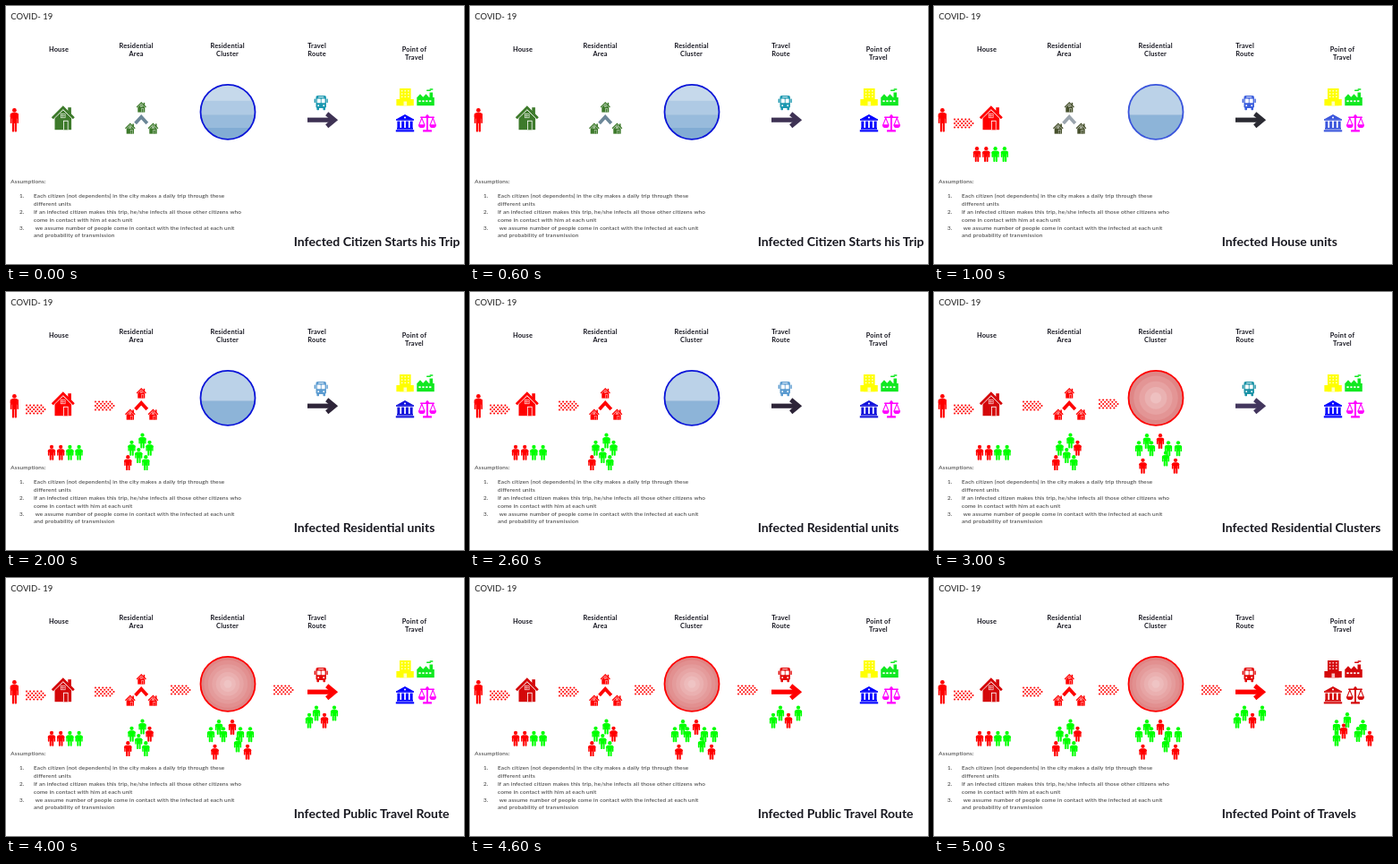
Write an HTML page with a canvas that moves like this. It is 512x288 px and loops after 6000 ms.

```html
<!DOCTYPE html>
<html lang="en">
<head>
<meta charset="utf-8">
<title>Trip of an infected citizen</title>
<style>
  html, body { margin: 0; width: 100%; height: 100%; overflow: hidden; background: #fff; }
  canvas, svg { position: absolute; left: 0; top: 0; width: 512px; height: 288px; }
  text { font-family: Lato, "Open Sans", sans-serif; white-space: pre; }
  .title { font-size: 9.5px; fill: #222; }
  .head { font-size: 7.4px; font-weight: 700; letter-spacing: .2px; text-anchor: middle; fill: #15151f; }
  .note { font-size: 6.4px; letter-spacing: .15px; fill: #333; }
  .caption { font-size: 14px; font-weight: 700; fill: #17171f; }
</style>
</head>
<body>
<canvas id="stage" width="512" height="288"></canvas>
<svg id="words" viewBox="0 0 512 288"></svg>
<script>
const ctx = document.getElementById('stage').getContext('2d');
const words = document.getElementById('words');
const STEP = 1000;
const RED = '#f00', DEEP = '#d4080a', GREEN = '#0f0', LEAF = '#3d7a2b';

// Colours of the parts the infection has not reached yet.
const scenes = [
  { text: 'Infected Citizen Starts his Trip', area: LEAF, peak: '#6c8798', edge: '#0a14d8',
    bus: '#1b98b0', arrow: '#3e3254', bank: '#00f', tones: 4 },
  { text: 'Infected House units', area: '#46502c', peak: '#9ba5ae', edge: '#3954dc',
    bus: '#3a5ddd', arrow: '#2b2b33', bank: '#3a55dc', tones: 2 },
  { text: 'Infected Residential units', edge: '#0a14d8',
    bus: '#5b9bd0', arrow: '#2d2438', bank: '#1212dc', tones: 2 },
  { text: 'Infected Residential Clusters', bus: '#1a92a6', arrow: '#43365e', bank: '#00f', tones: 5 },
  { text: 'Infected Public Travel Route', bank: '#00f', tones: 7 },
  { text: 'Infected Point of Travels', tones: 7 }
];

function addText(kind, x, y, str) {
  const el = document.createElementNS('http://www.w3.org/2000/svg', 'text');
  el.setAttribute('class', kind);
  el.setAttribute('x', x);
  el.setAttribute('y', y);
  el.textContent = str;
  words.append(el);
  return el;
}
function addHead(x, y, ...lines) {
  lines.forEach((str, i) => addText('head', x, y + i * 8.8, str));
}

addText('title', 5.3, 15, 'COVID- 19');
addHead(59, 51.3, 'House');
addHead(145.6, 46.9, 'Residential', 'Area');
addHead(247.6, 46.9, 'Residential', 'Cluster');
addHead(347.6, 46.9, 'Travel', 'Route');
addHead(456.5, 51.3, 'Point of', 'Travel');
addText('note', 5.3, 197.5, 'Assumptions:');
['Each citizen (not dependents) in the city makes a daily trip through these',
 'different units',
 'If an infected citizen makes this trip, he/she infects all those other citizens who',
 'come in contact with him at each unit',
 ' we assume number of people come in contact with the infected at each unit',
 'and probability of transmission'].forEach((str, i) => {
  const y = 214.4 + i * 8.8;
  if (i % 2 === 0) addText('note', 15, y, i / 2 + 1 + '.');
  addText('note', 31, y, str);
});
const caption = addText('caption', 321.8, 267.5, '');

function box(x, y, w, h, color, r = 0) {
  ctx.fillStyle = color;
  ctx.beginPath();
  ctx.roundRect(x, y, w, h, r);
  ctx.fill();
}
function disc(x, y, r, color, end = 7) {
  ctx.fillStyle = color;
  ctx.beginPath();
  ctx.arc(x, y, r, 0, end);
  ctx.fill();
}
// A peak of width w and height h around x, filled or as a stroke.
function peak(x, y, w, h, color, width) {
  ctx.beginPath();
  ctx.moveTo(x - w / 2, y + h);
  ctx.lineTo(x, y);
  ctx.lineTo(x + w / 2, y + h);
  ctx.fillStyle = ctx.strokeStyle = color;
  ctx.lineWidth = width;
  if (width) ctx.stroke();
  else ctx.fill();
}

function person(x, y, ill, w = 8.2, h = 17) {
  const color = ill ? RED : GREEN, r = w * 0.26;
  const top = y - h / 2, neck = top + r * 2 + 0.5, rest = y + h / 2 - neck;
  disc(x, top + r, r, color);
  box(x - w / 2, neck, w, rest * 0.3, color, w * 0.25);
  box(x - w * 0.28, neck, w * 0.56, rest * 0.55, color);
  for (const side of [-1, 1]) {
    box(x + side * w * 0.41 - w * 0.09, neck + 1, w * 0.18, rest * 0.5, color, 0.7);
    box(x + side * w * 0.155 - w * 0.12, neck + 1, w * 0.24, rest - 1, color, 0.7);
  }
}
function family(x, y, gap) {
  for (let i = 0; i < 4; i++) person(x + i * gap, y, i < 2);
}
// One person in front of two others; ill lists who of the three is infected.
function trio(x, y, left, right, ill = []) {
  [[x, y], [x - left, y + 8.2], [x + right, y + 8.2]].forEach((p, i) => person(...p, ill.includes(i)));
}

function trail(x, y) {
  for (let row = -2; row <= 2; row++) {
    const count = row ? 5 : 6;
    for (let i = 0; i < count; i++) disc(x + 1 + Math.abs(row % 2) * 2.05 + i * 4.1, y + row * 2.25, 1.05, RED);
  }
}

function house(x, y, size, color) {
  ctx.save();
  ctx.translate(x, y);
  ctx.scale(size, size);
  box(18.5, 2, 3.6, 8, color);
  peak(13, 4.5, 18.6, 9.2, color);
  box(3.7, 13.5, 18.6, 13.5, color);
  peak(13, 4.7, 24, 11.5, '#fff', 1);
  peak(13, 2, 24, 12, color, 2.8);
  box(10.2, 8.7, 5.4, 5.2, '#fff');
  for (let i = 0; i < 4; i++) box(10.8 + i % 2 * 2.3, 9.3 + (i >> 1) * 2.2, 1.9, 1.8, color);
  box(13.2, 16.6, 5.6, 10.4, '#fff');
  box(14, 17.5, 4, 9.5, color);
  ctx.restore();
}

function area(color, peakColor) {
  peak(151.2, 123.8, 13.2, 7.2, peakColor, 3.8);
  house(145.7, 107, 0.43, color);
  house(133, 130.5, 0.45, color);
  house(158.6, 130.5, 0.45, color);
}

// Stepped shading: water levels while healthy, rings once infected.
function cluster(edge, tones, ill) {
  const x = 248, y = 118.3, r = 30.5;
  ctx.save();
  ctx.beginPath();
  ctx.arc(x, y, r, 0, 7);
  ctx.clip();
  for (let i = 0; i < tones; i++) {
    const part = i / tones;
    if (ill) disc(x, y, 31 * (1 - part), `hsl(0 58% ${70 + 18 * part}%)`);
    else box(x - r, 86 + 64 * part ** 0.85, r * 2, 64, `hsl(209 49% ${88 - 24 * (i + 0.5) / tones}%)`);
  }
  ctx.restore();
  ctx.strokeStyle = edge;
  ctx.lineWidth = 1.8;
  ctx.beginPath();
  ctx.arc(x, y, r, 0, 7);
  ctx.stroke();
}

function bus(color) {
  const x = 352.2;
  box(x - 5.7, 100, 11.4, 14, color, 1.8);
  box(x - 3, 101.3, 6, 0.9, '#fff');
  for (const side of [-1, 1]) {
    box(x + side * 6.9 - 0.7, 103.5, 1.4, 4.5, color, 0.5);
    box(x + side * 3.5 - 1.3, 113, 2.6, 3.2, color, 0.6);
    box(x + side * 2.4 - 2, 103.6, 4, 4.6, '#fff', 0.4);
    disc(x + side * 3, 111.2, 0.9, '#fff');
  }
}

function arrow(color) {
  box(337, 124.6, 28, 5.2, color);
  ctx.save();
  ctx.translate(367.2, 127.2);
  ctx.rotate(Math.PI / 2);
  peak(0, 0, 14, 8.5, color, 5);
  ctx.restore();
}

function offices(color) {
  box(440, 92, 12.6, 19.2, color);
  box(436.4, 104, 19.4, 7.2, color);
  ctx.globalAlpha = 0.75;
  for (let i = 0; i < 9; i++) box(441.8 + i % 3 * 3.6, 94 + Math.floor(i / 3) * 3.3, 1.7, 1.5, '#fff');
  box(444.5, 106.5, 3.6, 4.7, '#fff');
  ctx.globalAlpha = 1;
}

function factory(color) {
  box(459.3, 102, 19.5, 9.2, color);
  box(473.5, 96.5, 3.6, 8, color);
  peak(463, 98.3, 7.4, 4, color);
  peak(469.5, 98.3, 7.4, 4, color);
  box(470, 93.4, 5, 1.5, color, 0.7);
  box(473.5, 92.2, 4, 1.5, color, 0.7);
  for (let i = 0; i < 4; i++) box(461.4 + i * 3.9, 105.3, 2.3, 1.8, '#fff');
}

function bank(color) {
  peak(446, 121, 20, 5.4, color);
  box(436, 126.2, 20, 1.6, color);
  disc(446, 124.6, 1, '#fff');
  for (let i = 0; i < 4; i++) box(437.4 + i * 4.75, 128.6, 3, 7.4, color);
  box(437, 136, 18, 1.7, color);
  box(435.8, 138.3, 20.4, 2.1, color);
}

function scales(color) {
  const x = 471;
  box(x - 1, 121.5, 2, 17.5, color);
  box(x - 8, 123.4, 16, 1.6, color, 0.7);
  disc(x, 123.2, 1.8, color);
  box(x - 5, 138.3, 10, 2.1, color, 0.5);
  for (const side of [-1, 1]) {
    peak(x + side * 6.2, 125, 6, 7.6, color, 1.1);
    disc(x + side * 6.2, 132.2, 3.9, color, Math.PI);
  }
}

// Every stage turns red, and stays red, once the infection reaches it.
function draw(n) {
  const s = scenes[n];
  const homeRed = n < 3 ? RED : DEEP;
  const point = healthy => n < 5 ? healthy : DEEP;
  ctx.fillStyle = '#fff';
  ctx.fillRect(0, 0, 512, 288);

  person(9.4, 127.3, true, 9.2, 26.5);
  house(50.8, 111.2, 1, n ? homeRed : LEAF);
  area(s.area || RED, s.peak || RED);
  cluster(s.edge || RED, s.tones, n >= 3);
  bus(s.bus || '#e40808');
  arrow(s.arrow || RED);
  offices(point('#ff0'));
  factory(point('#10e820'));
  bank(point(s.bank));
  scales(point('#f0f'));

  if (n === 1) family(48, 165.5, 10.3);
  if (n >= 1) trail(22, 131);
  if (n >= 2) {
    family(51, 179.3, 10.2);
    trail(99, 127);
    trio(152.5, 166, 12, 8, n > 2 ? [2] : []);
    trio(148.3, 182.4, 12, 8, [1]);
  }
  if (n >= 3) {
    trail(184, 125);
    trio(238, 166.5, 9, 5);
    trio(253, 166.5, -9, 20, [0]);
    trio(259, 186, 25.5, 11, [1, 2]);
  }
  if (n >= 4) {
    trail(299, 125);
    trio(347, 151, 8, 9, [2]);
    person(367, 151);
  }
  if (n >= 5) {
    trail(392.5, 125);
    trio(462, 158.5, 12, 17.5);
    trio(458, 171, 8, 29, [0, 2]);
    person(474, 174.5);
  }
  caption.textContent = s.text;
}

let shown = -1;
function tick() {
  const n = Math.floor(performance.now() / STEP) % scenes.length;
  if (n !== shown) draw(shown = n);
  requestAnimationFrame(tick);
}
tick();
</script>
</body>
</html>
```
